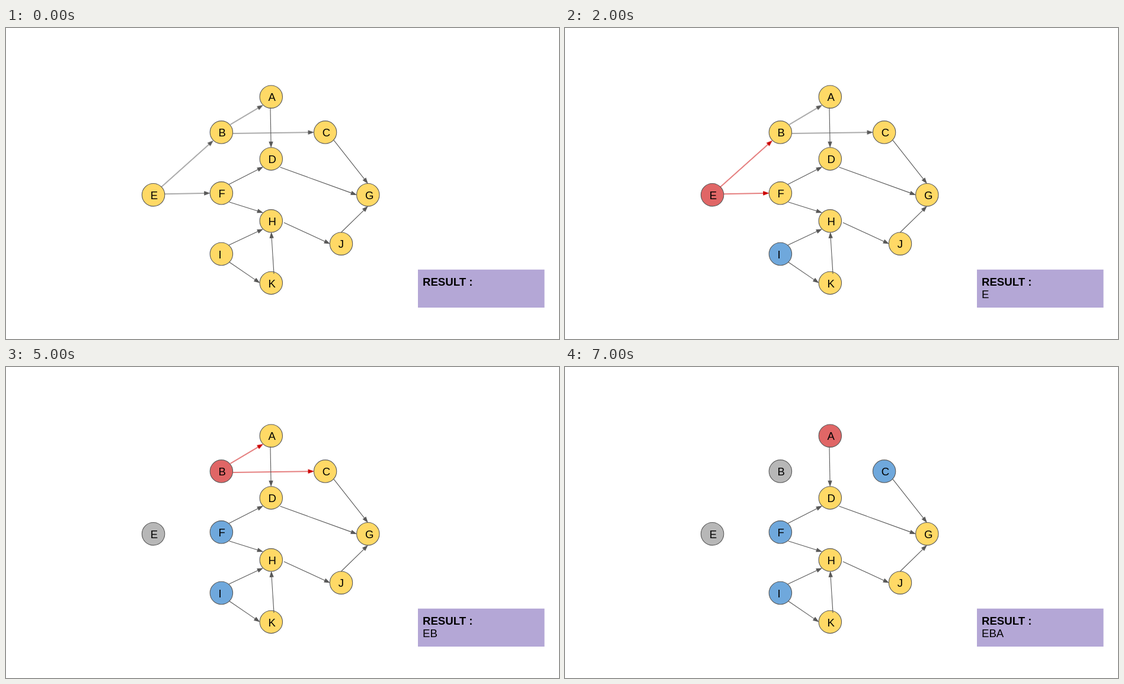
An HTML page that plays this animation: 933x525 px, repeating every 8 s.

```html
<!DOCTYPE html>
<html lang="en">
<head>
<meta charset="utf-8">
<title>Topological sort</title>
<style>
  :root {
    --idle: #ffd966; --ready: #6fa8dc; --active: #e06666; --done: #b7b7b7;
    --line: #595959; --hot: #cc0000;
  }
  html, body { margin: 0; width: 100%; height: 100%; overflow: hidden; background: #fff; }
  svg { display: block; width: 933px; height: 525px; }
  text { font: 18.6px "Liberation Sans", Arial, sans-serif; fill: #000; }
  .title { font-weight: bold; }
  circle { fill: var(--idle); stroke: var(--line); stroke-width: 1.1; }
  .edge { color: var(--line); stroke: currentColor; fill: currentColor; stroke-width: 1.1; }
  circle, .edge, tspan { animation: 8s step-end infinite; }

  #node-E { animation-name: nodeE; }
  #node-I { animation-name: nodeI; }
  #node-F { animation-name: nodeF; }
  #node-B { animation-name: nodeB; }
  #node-A { animation-name: nodeA; }
  #node-C { animation-name: nodeC; }
  .from-E { animation-name: edgesE; }
  .from-B { animation-name: edgesB; }
  #out-E { animation-name: outE; }
  #out-B { animation-name: outB; }
  #out-A { animation-name: outA; }

  @keyframes nodeE {
    0% { fill: var(--idle); } 12.5% { fill: var(--ready); }
    25% { fill: var(--active); } 50%, 100% { fill: var(--done); }
  }
  @keyframes nodeI { 0% { fill: var(--idle); } 12.5%, 100% { fill: var(--ready); } }
  @keyframes nodeF { 0% { fill: var(--idle); } 37.5%, 100% { fill: var(--ready); } }
  @keyframes nodeB {
    0% { fill: var(--idle); } 37.5% { fill: var(--ready); }
    50% { fill: var(--active); } 87.5%, 100% { fill: var(--done); }
  }
  @keyframes nodeA {
    0% { fill: var(--idle); } 75% { fill: var(--ready); } 87.5%, 100% { fill: var(--active); }
  }
  @keyframes nodeC { 0% { fill: var(--idle); } 75%, 100% { fill: var(--ready); } }
  @keyframes edgesE {
    0% { color: var(--line); opacity: 1; } 25% { color: var(--hot); opacity: 1; }
    37.5%, 100% { color: var(--hot); opacity: 0; }
  }
  @keyframes edgesB {
    0% { color: var(--line); opacity: 1; } 62.5% { color: var(--hot); opacity: 1; }
    75%, 100% { color: var(--hot); opacity: 0; }
  }
  @keyframes outE { 0% { fill: transparent; } 25%, 100% { fill: #000; } }
  @keyframes outB { 0% { fill: transparent; } 50%, 100% { fill: #000; } }
  @keyframes outA { 0% { fill: transparent; } 87.5%, 100% { fill: #000; } }
</style>
</head>
<body>
<svg viewBox="0 0 933 525">
  <g id="graph"></g>
  <rect x="695" y="407.8" width="213.5" height="64.2" fill="#b4a7d6"/>
  <text class="title" x="703" y="434.8">RESULT :</text>
  <text x="703" y="456.3"><tspan id="out-E">E</tspan><tspan id="out-B">B</tspan><tspan id="out-A">A</tspan></text>
</svg>
<script>
  const nodes = {
    A: [447.3, 116.2], B: [363.4, 176.1], C: [538.6, 176.1], D: [447.3, 220.9],
    E: [248.6, 281.7], F: [363.4, 278.8], G: [610.8, 281.7], H: [447.3, 325.8],
    I: [363.4, 381.5], J: [565.5, 364.2], K: [447.3, 430.4]
  };
  // start node, then start and tip of each arrow
  const edges = [
    ['B', 378.5, 163, 433.5, 130.3], ['B', 383, 178, 519.3, 176.1],
    ['A', 446, 134.5, 447.2, 201.5], ['E', 262, 268.5, 349.5, 190.2],
    ['E', 268, 280.2, 344, 278.8], ['F', 376, 264, 433.5, 234.7],
    ['F', 376.5, 293.8, 433.5, 311.7], ['C', 553, 189.3, 610.5, 262.5],
    ['D', 462.5, 235, 591.5, 281.7], ['H', 469, 328.5, 546.5, 364.2],
    ['J', 565.5, 345, 610.5, 301], ['I', 376, 366.5, 433.5, 339.5],
    ['I', 376.5, 395, 428, 430.2], ['K', 452, 415, 447.6, 345]
  ];

  const drawNode = ([name, [x, y]]) =>
    `<circle id="node-${name}" cx="${x}" cy="${y}" r="19.2"/>
     <text x="${x - 4.8}" y="${y + 7.2}">${name}</text>`;

  const drawEdge = ([from, x1, y1, x2, y2]) => {
    const length = Math.hypot(x2 - x1, y2 - y1);
    const angle = Math.atan2(y2 - y1, x2 - x1) * 180 / Math.PI;
    return `<g class="edge from-${from}" transform="translate(${x1} ${y1}) rotate(${angle})">
      <path d="M0 0H${length - 9}"/>
      <path d="M${length - 1} 0l-8.2 -2.9v5.8z"/></g>`;
  };

  document.getElementById('graph').innerHTML =
    Object.entries(nodes).map(drawNode).join('') + edges.map(drawEdge).join('');
</script>
</body>
</html>
```
